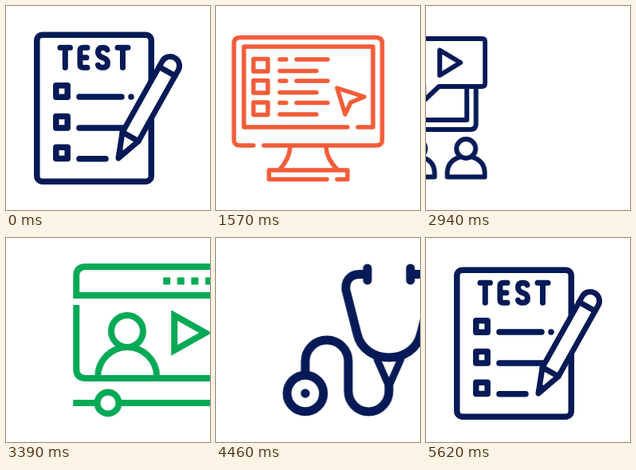
An HTML page without scripts that plays this animation: 256 px wide and 256 px high, repeating every 5820 ms.

```html
<!DOCTYPE html>
<html lang="en">
<head>
<meta charset="utf-8">
<title>Icon carousel</title>
<style>
html, body { margin: 0; width: 100%; height: 100%; overflow: hidden; background: #fff; }
svg { display: block; width: 100vw; height: 100vh; }
.icon {
  fill: none; stroke-linecap: round; stroke-linejoin: round;
  animation: 5.82s step-end -2ms infinite;
}
.navy { stroke: #051a56; color: #051a56; }
.green { stroke: #06a956; color: #06a956; }
.orange { stroke: #f15c38; color: #f15c38; }
.solid { fill: currentColor; stroke: none; }
.paper { fill: #fff; }

/* slides advance in 30 ms steps, then rest for 200 ms */
.test { animation-name: test; }
.shirt { animation-name: shirt; }
.monitor { animation-name: monitor; }
.class { animation-name: class; }
.player { animation-name: player; }
.scope { animation-name: scope; }
@keyframes test {
  0% { transform: none; animation-timing-function: steps(20); }
  10.3093% { transform: translateX(-440px); }
  81.6151% { transform: translate(371.2px, 4px); animation-timing-function: steps(29); }
  96.5636%, 100% { transform: translateY(4px); }
}
@keyframes shirt {
  0% { transform: translateX(244px); animation-timing-function: steps(20); }
  10.3093% { transform: none; }
  13.2302% { transform: none; animation-timing-function: steps(20); }
  23.5395%, 100% { transform: translateX(-440px); }
}
@keyframes monitor {
  0% { transform: translateX(244px); }
  13.2302% { transform: translateX(244px); animation-timing-function: steps(20); }
  23.5395% { transform: none; }
  26.4605% { transform: none; animation-timing-function: steps(30); }
  41.9244%, 100% { transform: translateX(-384px); }
}
@keyframes class {
  0% { transform: translateX(384px); }
  26.4605% { transform: translateX(384px); animation-timing-function: steps(30); }
  41.9244% { transform: none; }
  44.8454% { transform: none; animation-timing-function: steps(30); }
  60.3093%, 100% { transform: translateX(-384px); }
}
@keyframes player {
  0% { transform: translateX(384px); }
  44.8454% { transform: translateX(384px); animation-timing-function: steps(30); }
  60.3093% { transform: none; }
  63.2302% { transform: none; animation-timing-function: steps(30); }
  78.6942%, 100% { transform: translateX(-384px); }
}
@keyframes scope {
  0% { transform: translateX(384px); }
  63.2302% { transform: translateX(384px); animation-timing-function: steps(30); }
  78.6942% { transform: none; }
  81.6151% { transform: none; animation-timing-function: steps(29); }
  96.5636%, 100% { transform: translateX(-371.2px); }
}
</style>
</head>
<body>
<svg viewBox="0 0 256 256">
  <defs>
    <g id="half">
      <path d="M128 35H146Q156 36 166 41L192 51.5Q197 53 199 58L218 115Q221 123 213 124L181 126.5M179 100V212Q155 221 128 221"/>
      <path d="M152 36A24 22 0 0 1 128 58M164 40A36 33 0 0 1 128 68"/>
    </g>
    <g id="viewer">
      <circle cy="179" r="12"/>
      <path d="M-9 190Q-23.5 195 -23.5 210V214.500H23.500V210Q23.500 195 9 190"/>
    </g>
    <path id="row" d="M47 66.500H65V82H47ZM80 67H88M101 67H140M80 81.500H126"/>
    <rect id="box" x="62.800" y="99.800" width="14.400" height="14.400"/>
  </defs>

  <g class="icon navy test" stroke-width="7.500">
    <rect x="38.800" y="36.200" width="143.500" height="184" rx="7"/>
    <g role="img" aria-label="TEST" stroke-width="7">
      <path d="M68 52.300H80.500M74.300 52.300V77.300"/>
      <path d="M102 52.300H97Q93 52.300 93 56V73.500Q93 77.300 97 77.300H102M93 64.800H101"/>
      <path d="M127 55Q126 52.300 121.500 52.300Q115.500 52.300 115.500 58Q115.500 63 121.500 64.800Q127.500 66.500 127.500 71.500Q127.500 77.300 121.500 77.300Q116.500 77.300 115.500 74"/>
      <path d="M140 52.300H153M146.500 52.300V77.300"/>
    </g>
    <use href="#box"/>
    <use href="#box" y="38.700"/>
    <use href="#box" y="77.400"/>
    <path d="M92 114H145M157 114V114.01M92 153H147M92 191.700H125"/>
    <g transform="translate(141 191) rotate(29.3)" stroke-width="7">
      <path class="paper" d="M0 0L-11.5 -31V-133A11.5 11.5 0 0 1 11.5 -133V-31Z"/>
      <path d="M-11.5 -31H11.5M-11.5 -125H11.5"/>
      <path class="solid" d="M0 0L-5 -12H5Z"/>
    </g>
  </g>

  <g class="icon green shirt" stroke-width="6">
    <use href="#half"/>
    <use href="#half" transform="matrix(-1 0 0 1 256 0)"/>
  </g>

  <g class="icon orange monitor" stroke-width="5.500">
    <g transform="translate(12.8)">
      <path d="M47 175H30Q22.5 175 22.5 168V47Q22.5 39.5 30 39.5H201Q208.5 39.5 208.5 47V168Q208.5 175 201 175H60"/>
      <path d="M165 152H35V51H197V152H178"/>
      <use href="#row"/>
      <use href="#row" y="27"/>
      <use href="#row" y="54.500"/>
      <path d="M152 103L186 114L169 121L162 136Z"/>
      <path d="M93 177Q92 192 80 205M138 177Q139 192 152 205"/>
      <path d="M139 217.5H66.5V206H165V217.5H152"/>
    </g>
  </g>

  <g class="icon navy class" stroke-width="6">
    <path d="M123 47H49Q41.5 47 41.5 54V82M41.5 95V97M41.5 108V148Q41.5 155 49 155H196Q203.5 155 203.5 148V104"/>
    <path d="M123 59H53V143H192V105"/>
    <path d="M66 142Q66 129 77 126L86 123M86 116V123Q86 131 95.5 131Q105 131 105 123V116M105 123L114 126Q125 129 125 142"/>
    <path d="M77 95V86Q77 71 94 71H103Q113 73 113 84V95Q104 95 99 89Q93 95 85 95ZM81 96V101Q83 116 95.5 116.5Q108 116 109 101V96"/>
    <path class="paper" d="M131 41H211Q215 41 215 45V97Q215 101 211 101H157L138 119V101H131Q126.500 101 126.500 97V45Q126.500 41 131 41Z"/>
    <path d="M158 55.500V87L184 71Z"/>
    <use href="#viewer" x="65.500"/>
    <use href="#viewer" x="128"/>
    <use href="#viewer" x="191"/>
  </g>

  <g class="icon green player" stroke-width="8">
    <path stroke-linejoin="miter" d="M37 72V48Q37 36 49 36H208Q220 36 220 48V72Z"/>
    <path stroke-linecap="butt" d="M37 84V164Q37 176 49 176H208Q220 176 220 164V84"/>
    <path stroke-linecap="butt" stroke-width="9" stroke-dasharray="9 8.6" d="M146 54H208"/>
    <circle cx="100.800" cy="117" r="20"/>
    <path stroke-linecap="butt" d="M64 174A37 37 0 0 1 138 174"/>
    <path stroke-linejoin="miter" d="M160 97V141L199 119Z"/>
    <path stroke-linecap="butt" d="M33 207H62M91 207H224"/>
    <circle cx="76.800" cy="207" r="13.500"/>
  </g>

  <g class="icon navy scope" stroke-width="11">
    <g transform="translate(-51.2)">
      <circle cx="112" cy="195" r="22.800"/>
      <circle class="solid" cx="112" cy="195" r="5.700"/>
      <path d="M112 170V155A27 27 0 0 1 166 155V192A25.5 26 0 0 0 217 192V186"/>
      <path stroke-width="9" d="M202 152L217 186L232 152"/>
      <path d="M190 38V53M244 38V53"/>
      <path d="M188 45.5H180C168 45.5 162 54 163 65L177 120C186 160 248 160 257 120L271 65C272 54 266 45.5 254 45.5H246"/>
    </g>
  </g>
</svg>
</body>
</html>
```
